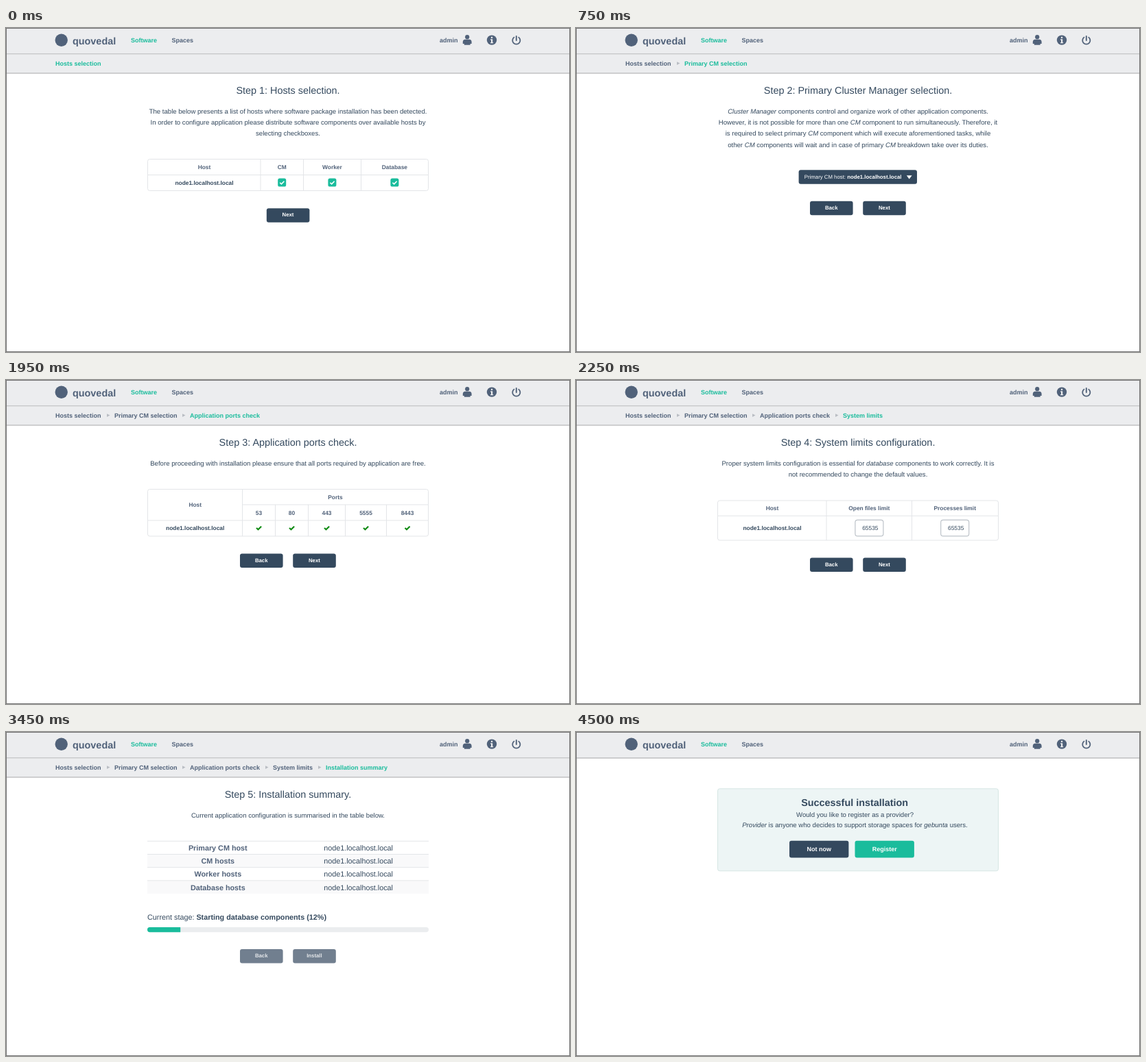
Animation, 822 px wide and 473 px high, one loop 5250 ms. Source, as an HTML page:

```html
<!DOCTYPE html>
<html lang="en">
<head>
<meta charset="utf-8">
<title>Installation wizard</title>
<style>
html, body { margin: 0; width: 100%; height: 100%; overflow: hidden; background: #fff; }
svg { display: block; width: 822px; height: 473px; }
text { font-family: "Liberation Sans", Arial, Helvetica, sans-serif; text-rendering: geometricPrecision; white-space: pre; }
</style>
</head>
<body>
<svg id="stage" viewBox="0 0 822 473" xmlns="http://www.w3.org/2000/svg"></svg>
<script>
const STEP = 750;
const INK = '#34495e', SOFT = '#51627a', GREEN = '#1abc9c', BAR = '#ecedef', LINE = '#e3e5e8';
const HOST = 'node1.localhost.local';

// Text helpers; <i> and <b> inside a string become styled spans.
const spans = s => s
  .replace(/<i>/g, '<tspan font-style="italic">')
  .replace(/<b>/g, '<tspan font-weight="bold">')
  .replace(/<\/[ib]>/g, '</tspan>');
const text = (s, x, y, size, fill = INK, anchor = 'start', weight = 'normal') =>
  `<text x="${x}" y="${y}" font-size="${size}" fill="${fill}" text-anchor="${anchor}" font-weight="${weight}">${spans(s)}</text>`;
const bold = (s, x, y, size, fill) => text(s, x, y, size, fill, 'start', 'bold');
const mid = (s, x, y, size, fill) => text(s, x, y, size, fill, 'middle');
const midBold = (s, x, y, size, fill) => text(s, x, y, size, fill, 'middle', 'bold');

const rect = (x, y, w, h, fill, r = 0, stroke = 'none', sw = 1) =>
  `<rect x="${x}" y="${y}" width="${w}" height="${h}" rx="${r}" fill="${fill}" stroke="${stroke}" stroke-width="${sw}"/>`;
const path = (d, stroke, sw = 1, extra = '') =>
  `<path d="${d}" fill="none" stroke="${stroke}" stroke-width="${sw}" ${extra}/>`;
const shape = (d, fill) => `<path d="${d}" fill="${fill}"/>`;

function header() {
  return rect(0, 0, 822, 38, BAR) + rect(0, 37.5, 822, 1, '#a3a4a6') +
    `<circle cx="80.7" cy="17.7" r="9.2" fill="${SOFT}"/>` +
    bold('quovedal', 97, 23.6, 14.4, SOFT) +
    bold('Software', 182, 20.6, 9, GREEN) +
    bold('Spaces', 241.5, 20.6, 9, SOFT) +
    bold('admin', 632, 21.2, 9, SOFT) +
    `<circle cx="672.2" cy="13.2" r="3.1" fill="${SOFT}"/>` +
    shape('M668.5 16.8H676Q678.6 17.4 678.6 20.5V23H676.6V24.8H667.8V23H665.8V20.5Q665.8 17.4 668.5 16.8Z', SOFT) +
    `<circle cx="708" cy="17.6" r="7.2" fill="${SOFT}"/>` +
    rect(706.9, 12.8, 2.3, 2.1, BAR, .6) +
    shape('M706 16.2H709.2V21H710.2V22.3H706V21H707V17.5H706Z', BAR) +
    path('M740.4 13.6A5.6 5.6 0 1 0 747.2 13.6', SOFT, 1.8, 'stroke-linecap="round"') +
    path('M743.8 12V18', SOFT, 1.9, 'stroke-linecap="round"');
}

const CRUMBS = [['Hosts selection', 72], ['Primary CM selection', 158], ['Application ports check', 268],
  ['System limits', 389], ['Installation summary', 466]];

function crumbs(count) {
  let out = rect(0, 38.5, 822, 27, BAR) + rect(0, 65.5, 822, 1, '#a3a4a6');
  CRUMBS.slice(0, count).forEach(([label, x], i) => {
    if (i) out += shape(`M${x - 11} 49.2L${x - 6.5} 51.6L${x - 11} 54Z`, '#b9bdc3');
    out += bold(label, x, 55, 9, i === count - 1 ? GREEN : SOFT);
  });
  return out;
}

const page = (n, title, lines) => crumbs(n) +
  mid(`Step ${n}: ${title}`, 411, 95.9, 14.4) +
  lines.map((s, i) => mid(s, 411, 124.6 + i * 16.3, 9.6)).join('');

const button = (label, x, y, fill = INK, color = '#fff') =>
  rect(x, y, 62.6, 20.5, fill, 3) + midBold(label, x + 31.2, y + 12.2, 7.8, color);
const pair = (y, next = 'Next', fill, color) =>
  button('Back', 341, y, fill, color) + button(next, 418.2, y, fill, color);

const frame = (y, h, lines) => rect(206.5, y, 409, h, '#fff', 3, LINE) + path(lines, LINE);
const head = (s, x, y) => midBold(s, x, y, 8.4, SOFT);
const cell = (s, x, y) => midBold(s, x, y, 8.4, INK);

const checkbox = (x, y) => rect(x - 6, y - 6, 12, 12, GREEN, 2.6) +
  path(`M${x - 3} ${y + .1}l2.2 2.2l4 -4.2`, '#fff', 1.6);
const tick = x => path(`M${x - 3.5} 215.9l2.5 2.4l4.6 -4.6`, '#0f8a12', 2.1);

function hosts() {
  return page(1, 'Hosts selection.', [
    'The table below presents a list of hosts where software package installation has been detected.',
    'In order to configure application please distribute software components over available hosts by',
    'selecting checkboxes.']) +
    frame(191.5, 46, 'M206.5 214.5H615.5M371 191.5V237.5M433.5 191.5V237.5M517.5 191.5V237.5') +
    head('Host', 289, 206.2) + cell(HOST, 289, 229) +
    [['CM', 402.2], ['Worker', 475.4], ['Database', 566.4]]
      .map(([s, x]) => head(s, x, 206.2) + checkbox(x, 225.6)).join('') +
    button('Next', 379.8, 263.2);
}

function primary() {
  return page(2, 'Primary Cluster Manager selection.', [
    '<i>Cluster Manager</i> components control and organize work of other application components.',
    'However, it is not possible for more than one <i>CM</i> component to run simultaneously. Therefore, it',
    'is required to select primary <i>CM</i> component which will execute aforementioned tasks, while',
    'other <i>CM</i> components will wait and in case of primary <i>CM</i> breakdown take over its duties.']) +
    rect(324.6, 207.2, 172.4, 20.6, INK, 3) +
    text(`Primary CM host: <b>${HOST}</b>`, 332.8, 219.6, 7.8, '#fff') +
    shape('M481.8 215.2H489.6L485.7 220.4Z', '#fff') +
    pair(252.8);
}

function ports() {
  const list = [[53, 368.5], [80, 416.5], [443, 467.5], [5555, 524.5], [8443, 585]];
  return page(3, 'Application ports check.', [
    'Before proceeding with installation please ensure that all ports required by application are free.']) +
    frame(159.5, 68.5, 'M344.5 182H615.5M206.5 205H615.5M344.5 159.5V228M392.5 182V228M440.5 182V228M494.5 182V228M554.5 182V228') +
    head('Host', 275.7, 185.2) + head('Ports', 480, 173.9) + cell(HOST, 275.7, 219.2) +
    list.map(([n, x]) => head(String(n), x, 196.8) + tick(x)).join('') +
    pair(253.4);
}

function limits() {
  const field = x => rect(x - 20.5, 204.4, 41, 23.4, '#fff', 3.4, '#bdc3c9', 1.2) +
    text('65535', x - 10.2, 219.4, 8.4);
  return page(4, 'System limits configuration.', [
    'Proper system limits configuration is essential for <i>database</i> components to work correctly. It is',
    'not recommended to change the default values.']) +
    frame(176, 58, 'M206.5 198.3H615.5M365 176V234M489.5 176V234') +
    head('Host', 286, 190.2) + head('Open files limit', 427.3, 190.2) + head('Processes limit', 552.2, 190.2) +
    cell(HOST, 286, 218.8) + field(427.4) + field(552.2) +
    pair(259.6);
}

function summary(stage, percent, width) {
  const rows = ['Primary CM host', 'CM hosts', 'Worker hosts', 'Database hosts'];
  return page(5, 'Installation summary.', [
    'Current application configuration is summarised in the table below.']) +
    rows.map((s, i) => {
      const y = 159.3 + i * 19.2;
      return rect(206, y, 410, 19.2, i % 2 ? '#f9f9fa' : '#fff') + path(`M206 ${y}H616`, LINE) +
        midBold(s, 308.8, y + 13.6, 10.8, SOFT) + mid(HOST, 513.6, y + 13.6, 10.8);
    }).join('') +
    text(`Current stage: <b>Starting ${stage} components (${percent}%)</b>`, 206, 273.6, 10.8) +
    rect(206, 285, 410, 7.2, '#ebedef', 3.6) +
    shape(`M209.6 285H${206 + width}V292.2H209.6A3.6 3.6 0 0 1 209.6 285Z`, GREEN) +
    pair(317.1, 'Install', '#717f8f', '#e4e7ea');
}

function done() {
  const big = (s, x, fill) => rect(x, 158.7, 86.4, 24.8, fill, 3) + midBold(s, x + 43.2, 174, 9, '#fff');
  return rect(206.5, 82.8, 409, 120, '#edf5f5', 3, '#d6e6e4') +
    midBold('Successful installation', 406.2, 108.1, 14.4, INK) +
    mid('Would you like to register as a provider?', 406.5, 124, 9.6) +
    mid('<i>Provider</i> is anyone who decides to support storage spaces for <i>gebunta</i> users.', 406.5, 138.9, 9.6) +
    big('Not now', 311, INK) + big('Register', 406.5, GREEN);
}

const scenes = [hosts(), primary(), ports(), limits(),
  summary('database', 12, 48.2), summary('worker', 62, 254.4), done()];

const stage = document.getElementById('stage');
stage.innerHTML = rect(0, 0, 822, 473, '#fff') + header() +
  scenes.map(s => `<g class="scene" visibility="hidden">${s}</g>`).join('') +
  rect(.5, .5, 821, 472, 'none', 0, '#747474');
const groups = stage.querySelectorAll('.scene');

function show(time) {
  const now = Math.floor(time / STEP) % scenes.length;
  groups.forEach((g, i) => g.setAttribute('visibility', i === now ? 'visible' : 'hidden'));
}

const start = performance.now();
function tickClock() {
  show(Math.max(0, performance.now() - start));
  requestAnimationFrame(tickClock);
}
tickClock();
</script>
</body>
</html>
```
